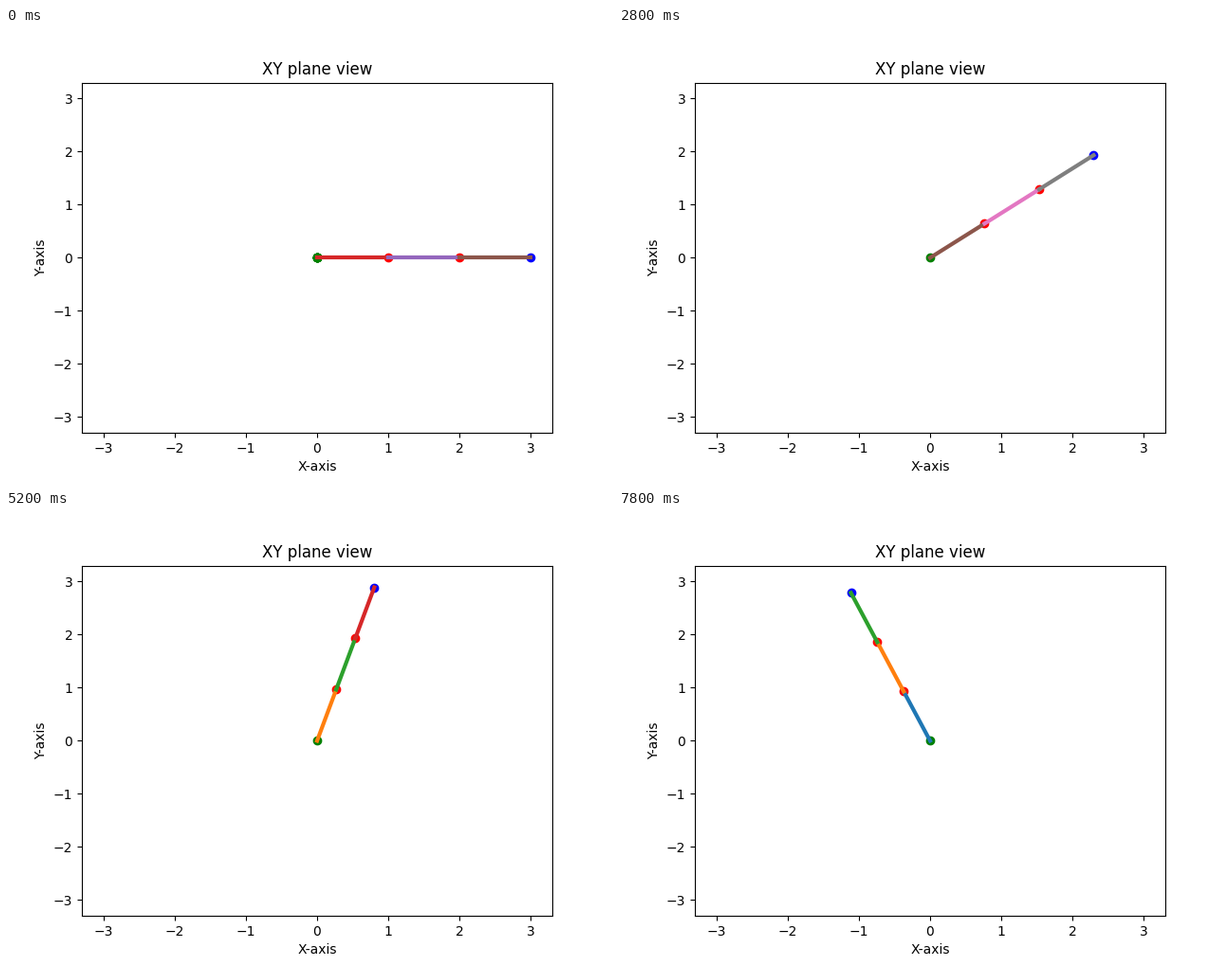
Animation, 640 px wide and 480 px high, one loop 8 s. Source, as a matplotlib script:

```python
import numpy as np
import matplotlib.pyplot as plt
from matplotlib.animation import FuncAnimation

FRAMES = 40
INTERVAL = 200
STEP = 0.05   # radians per frame
LINKS = 3
LIMIT = 3.3

fig, ax = plt.subplots(figsize=(6.4, 4.8), dpi=100)
ax.set(xlim=(-LIMIT, LIMIT), ylim=(-LIMIT, LIMIT),
       xlabel="X-axis", ylabel="Y-axis", title="XY plane view")

# Joints sit below the links; stacked base dots harden the rim at the start.
base_stack = [ax.plot(0, 0, "o", color="green")[0] for _ in range(6)]
joint_colors = ["green"] + ["red"] * (LINKS - 1) + ["blue"]
joints = [ax.plot([], [], "o", color=c)[0] for c in joint_colors]
links = [ax.plot([], [], lw=3)[0] for _ in range(LINKS)]


def update(i):
    reach = np.arange(LINKS + 1)
    x = reach * np.cos(STEP * i)
    y = reach * np.sin(STEP * i)
    for dot in base_stack:
        dot.set_visible(i == 0)
    for k, joint in enumerate(joints):
        joint.set_data([x[k]], [y[k]])
    for k, link in enumerate(links):
        link.set_data(x[k:k + 2], y[k:k + 2])
        # The colour cycle runs on from one frame to the next.
        link.set_color(f"C{(LINKS * (i + 1) + k) % 10}")
    return base_stack + joints + links


anim = FuncAnimation(fig, update, frames=FRAMES, interval=INTERVAL,
                     repeat=True, repeat_delay=0, blit=False)
plt.show()
```
